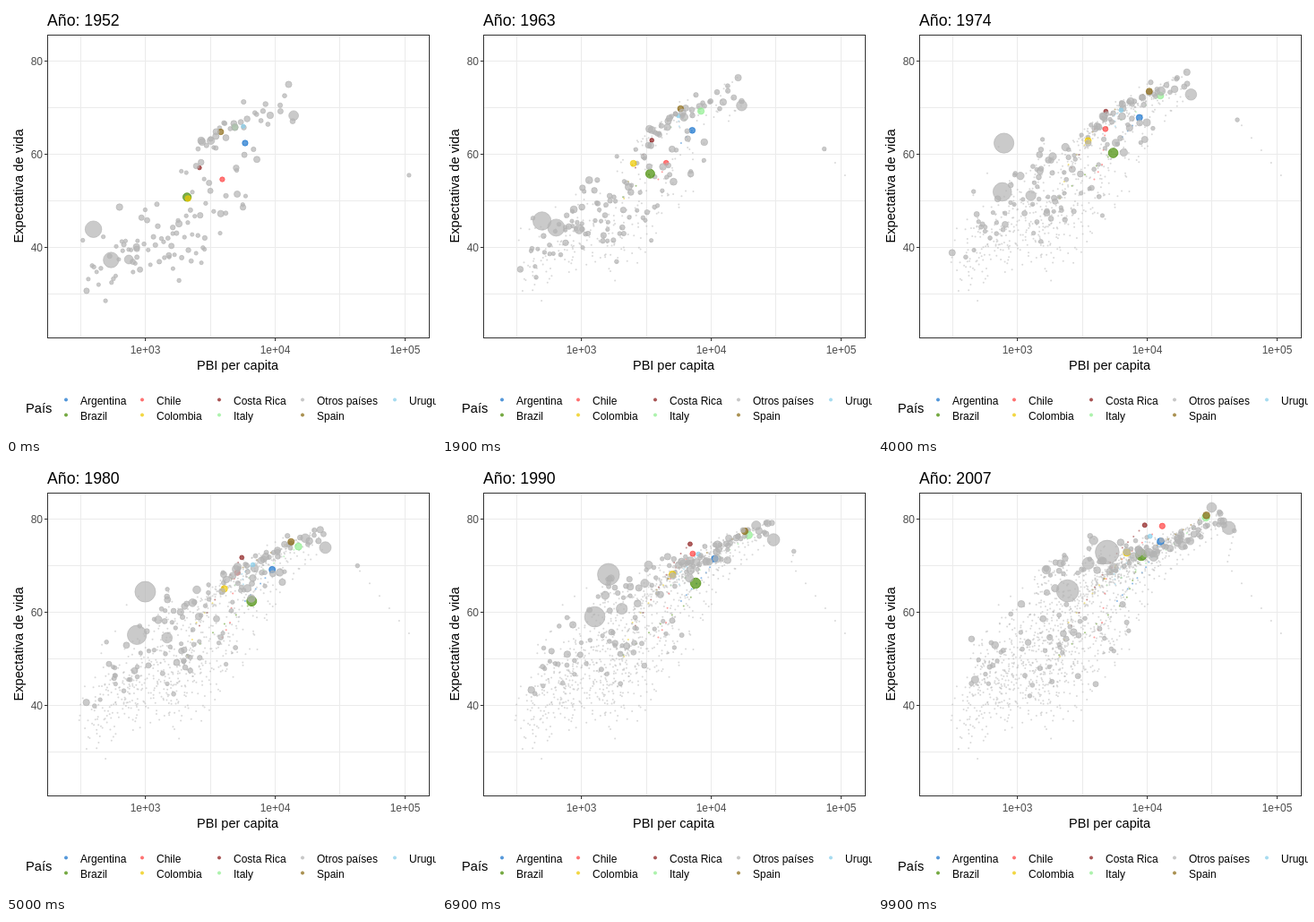
These frames come from a looping animation (480 by 480 pixels, 10 s). An HTML page with a canvas:

```html
<!DOCTYPE html>
<html lang="es">
<head>
<meta charset="utf-8">
<style>
html, body { margin: 0; width: 100%; height: 100%; overflow: hidden; background: #fff; }
canvas { display: block; width: 480px; height: 480px; }
</style>
</head>
<body>
<canvas id="c" width="480" height="480"></canvas>
<script>
const ctx = document.getElementById('c').getContext('2d');
const FONT = '"Liberation Sans", Arial, sans-serif';
const GREY = '#b3b3b3';
const STEPS = 12, FRAMES = 100, FRAME_MS = 100;
const DECADE = 144.8;

const px = lg => 155.2 + (lg - 3) * DECADE;
const py = life => 62 + (80 - life) * 5.2;
const mix = (a, b, u) => a + (b - a) * u;

const COLORS = {
  'Argentina': '#1874cd', 'Brazil': '#458b00', 'Chile': '#ff4040',
  'Colombia': '#eec900', 'Costa Rica': '#8b1a1a', 'Italy': '#90ee90',
  'Otros países': GREY, 'Spain': '#8b6914', 'Uruguay': '#87ceeb'
};

const countries = [];

// Each key is one survey, five years apart
function add(name, pop, grow, pathAt) {
  const keys = Array.from({ length: STEPS }, (_, k) => {
    const [lg, life] = pathAt(k);
    return [px(lg), py(life)];
  });
  countries.push({ name, pop, grow, keys, color: COLORS[name] || GREY });
}

// Path through a few key points of income and life expectancy
function trace(name, pop, knots, income, life) {
  const lg = income.map(Math.log10);
  add(name, pop, 2.4, k => {
    let i = 0;
    while (i < knots.length - 2 && k > knots[i + 1]) i++;
    const u = (k - knots[i]) / (knots[i + 1] - knots[i]);
    return [mix(lg[i], lg[i + 1], u), mix(life[i], life[i + 1], u)];
  });
}

const FOUR = [0, 2, 5.5, 11], THREE = [0, 5.5, 11];

trace('Argentina', 40, FOUR, [5911, 7133, 9600, 12779], [62.5, 65.1, 69.2, 75.3]);
trace('Brazil', 190, FOUR, [2109, 3337, 6850, 9066], [50.9, 55.7, 62.4, 72.4]);
trace('Chile', 16, FOUR, [3940, 4519, 4930, 13172], [54.7, 57.9, 68.8, 78.6]);
trace('Colombia', 44, FOUR, [2144, 2492, 4100, 7007], [50.6, 57.9, 65.2, 72.9]);
trace('Costa Rica', 4, FOUR, [2627, 3461, 5590, 9645], [57.2, 62.8, 72.1, 78.8]);
trace('Italy', 58, FOUR, [4931, 8244, 15350, 28570], [65.9, 69.2, 74.2, 80.5]);
trace('Spain', 40, FOUR, [3834, 5694, 13600, 28821], [64.9, 69.7, 75.3, 80.9]);
trace('Uruguay', 3, FOUR, [5717, 5603, 6700, 10611], [66.1, 68.3, 70.1, 76.4]);

trace('China', 1318, [0, 2, 3.4, 7.6, 11],
  [400, 490, 635, 1550, 4959], [44, 44.5, 60.6, 68.2, 73]);
trace('India', 1110, THREE, [547, 835, 2452], [37.4, 55.5, 64.7]);
trace('United States', 301, THREE, [13990, 24400, 42952], [68.4, 74, 78.2]);
trace('Japan', 127, THREE, [3217, 17900, 31656], [63, 76.2, 82.6]);
trace('Indonesia', 223, THREE, [750, 1450, 3541], [37.5, 54.5, 70.6]);
trace('Kuwait', 2.5, THREE, [108382, 41500, 47307], [55.6, 70.3, 77.6]);

// All other countries: seeded paths, one rule per region
let seed = 1952;
function rnd() {
  seed = (seed + 0x6d2b79f5) | 0;
  let t = Math.imul(seed ^ (seed >>> 15), 1 | seed);
  t = (t + Math.imul(t ^ (t >>> 7), 61 | t)) ^ t;
  return ((t ^ (t >>> 14)) >>> 0) / 4294967296;
}
const noise = s => (rnd() + rnd() + rnd() - 1.5) * s;

// q ranks a country inside its region, from poor to rich
const regions = {
  africa(q) {
    const l0 = 36.5 + 6 * q + noise(8);
    return { g0: 2.52 + 0.95 * q, g1: 2.68 + 1.0 * q + noise(0.4),
      l0, l1: l0 + 18 + noise(9), dip: 16 * rnd() ** 3,
      pop: 1.5 + 50 * rnd() ** 4, grow: 3.2, wander: 0.08 };
  },
  middle(q) {
    return { g0: 2.9 + 0.9 * q + noise(0.2), g1: 3.3 + 0.85 * q + noise(0.35),
      l0: 40 + 19 * q + noise(10), l1: 69 + 6 * q + noise(4), dip: 0,
      pop: 2 + 90 * rnd() ** 4, grow: 2.8, wander: 0.08 };
  },
  rich(q) {
    return { g0: 3.4 + 0.7 * q + noise(0.12), g1: 3.9 + 0.72 * q ** 0.7 + noise(0.06),
      l0: 61 + 10.5 * q ** 0.7 + noise(3), l1: 73 + 7.5 * q + noise(1.5), dip: 0,
      pop: 4 + 70 * rnd() ** 3, grow: 1.3, wander: 0.03 };
  }
};

function addRegion(kind, count) {
  for (let i = 0; i < count; i++) {
    const r = regions[kind]((i + rnd()) / count);
    const name = String.fromCharCode(65 + Math.floor(rnd() * 26)) + 'm';
    let drift = 0;
    add(name, r.pop, r.grow, k => {
      const u = k / (STEPS - 1), rise = 1 - (1 - u) ** 1.5;
      const lg = mix(r.g0, r.g1, u) + drift;
      drift = drift * 0.8 + noise(r.wander);
      return [2.46 + Math.abs(lg - 2.46),
        mix(r.l0, r.l1, rise) - r.dip * u ** 4 + noise(0.7)];
    });
  }
}
addRegion('africa', 50);
addRegion('middle', 48);
addRegion('rich', 30);
countries.sort((a, b) => (a.name < b.name ? -1 : a.name > b.name ? 1 : 0));

const radius = pop => 1.9 + 11.4 * Math.sqrt(pop / 1318);

function dot(x, y, r, color) {
  ctx.globalAlpha = 0.7;
  ctx.fillStyle = ctx.strokeStyle = color;
  ctx.lineWidth = 0.9;
  ctx.beginPath();
  ctx.arc(x, y, r, 0, 7);
  ctx.fill();
  ctx.stroke();
  ctx.globalAlpha = 1;
}

function text(s, x, y, size, color = '#000', align = 'left') {
  ctx.font = size + 'px ' + FONT;
  ctx.fillStyle = color;
  ctx.textAlign = align;
  ctx.fillText(s, x, y);
}

function box(x, y, w, h, color) {
  ctx.fillStyle = color;
  ctx.fillRect(x, y, w, h);
}

function drawPanel() {
  for (let i = 0; i < 3; i++) {
    const x = px(3 + i), y = py(80 - 20 * i), tick = Math.round(x);
    for (const gx of [x - DECADE / 2, x]) box(Math.round(gx), 33, 1, 337, '#ebebeb');
    for (const gy of [y, y + 52]) box(47, gy - 1, 425, 1, '#ebebeb');
    box(tick, 371, 1, 3, '#333');
    box(43, y - 1, 3, 1, '#333');
    text('1e+0' + (3 + i), tick + 0.5, 388, 12, '#4d4d4d', 'center');
    text(String(80 - 20 * i), 41, y + 4, 12, '#4d4d4d', 'right');
  }
  text('PBI per capita', 258.5, 406, 14.5, '#000', 'center');
  ctx.save();
  ctx.translate(19, 201);
  ctx.rotate(-Math.PI / 2);
  text('Expectativa de vida', 0, 0, 14.67, '#000', 'center');
  ctx.restore();
}

function drawLegend() {
  const cols = [67, 152, 238, 331, 434];
  text('País', 22, 454, 14.67);
  Object.keys(COLORS).forEach((name, i) => {
    const x = cols[i >> 1], y = 439.5 + 17 * (i % 2);
    dot(x, y, 1.6, COLORS[name]);
    text(name, x + 16, y + 5.5, 12);
  });
}

function drawTrails(k) {
  ctx.globalAlpha = 0.5;
  for (const c of countries) {
    ctx.fillStyle = c.color;
    for (let j = 0; j < k; j++) {
      ctx.beginPath();
      ctx.arc(...c.keys[j], 1, 0, 7);
      ctx.fill();
    }
  }
  ctx.globalAlpha = 1;
}

function drawBubbles(k, u) {
  const i = Math.min(STEPS - 2, Math.floor(k)), f = k - i;
  for (const c of countries) {
    const a = c.keys[i], b = c.keys[i + 1];
    const pop = mix(c.pop / c.grow, c.pop, u);
    dot(mix(a[0], b[0], f), mix(a[1], b[1], f), radius(pop), c.color);
  }
}

function draw(ms) {
  const frame = Math.floor(ms / FRAME_MS) % FRAMES;
  const u = frame / (FRAMES - 1), k = u * (STEPS - 1);

  box(0, 0, 480, 480, '#fff');
  drawPanel();
  ctx.save();
  ctx.beginPath();
  ctx.rect(46, 32, 427, 339);
  ctx.clip();
  drawTrails(k);
  drawBubbles(k, u);
  ctx.restore();
  ctx.strokeStyle = '#333';
  ctx.lineWidth = 1;
  ctx.strokeRect(46.5, 32.5, 426, 338);
  text('Año: ' + Math.round(1952 + 55 * u), 46, 22, 17.7);
  drawLegend();
}

const start = performance.now();
function tick() {
  draw(performance.now() - start);
  requestAnimationFrame(tick);
}
tick();
</script>
</body>
</html>
```
